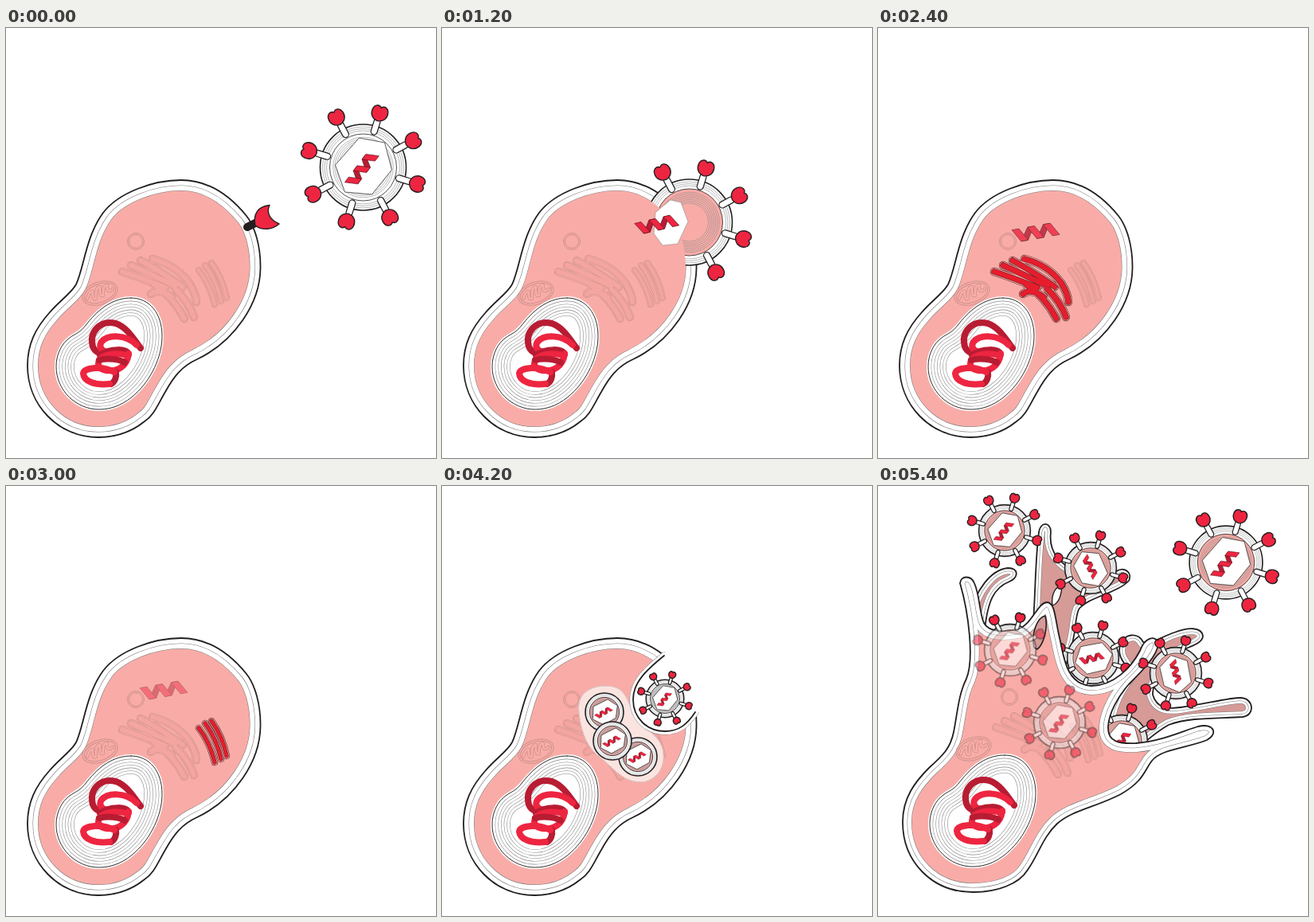
Write an HTML page that moves like this. It is 540 px wide and 540 px high and loops after 6000 ms.

```html
<!DOCTYPE html>
<html lang="en">
<head>
<meta charset="utf-8">
<title>Virus life cycle</title>
<style>
  html, body { margin: 0; width: 100%; height: 100%; overflow: hidden; background: #fff; }
  svg { display: block; width: 100%; height: 100%; }
  .scene { visibility: hidden; animation: show 6s step-end infinite; animation-delay: calc(var(--i) * 600ms - 6000ms); }
  @keyframes show { 0% { visibility: visible; } 10%, 100% { visibility: hidden; } }
  .ink { stroke: #231f20; vector-effect: non-scaling-stroke; stroke-linejoin: round; }
  .hair { fill: none; stroke: #888; stroke-width: .6; }
</style>
</head>
<body>
<svg id="stage" viewBox="0 0 540 540"></svg>
<script>
const PINK = '#f9aca7', PALE = '#fbe4e0', ROSE = '#d69a97', RED = '#ee2540', DARK = '#b81c33', INK = '#231f20';
let ids = 0;

const range = (from, to, step) => Array.from({ length: Math.floor((to - from) / step) + 1 }, (_, i) => from + i * step);
const path = (d, fill, stroke, width) =>
  `<path d="${d}" fill="${fill}" stroke="${stroke}" stroke-width="${width}" stroke-linecap="round" stroke-linejoin="round"/>`;
const at = (x, y, s, content, turn = 0) => `<g transform="translate(${x} ${y}) rotate(${turn}) scale(${s})">${content}</g>`;
const fade = (opacity, content) => `<g opacity="${opacity}">${content}</g>`;

// Inner contour lines: wide strokes clipped to the shape, widest first.
function contours(d, fill, depths, line = '#777', edge = 1.8) {
  const id = 'c' + ids++;
  const bands = depths.map(n => path(d, 'none', line, 2 * n + 1.1) + path(d, 'none', '#fff', 2 * n)).join('');
  return `<clipPath id="${id}"><path d="${d}"/></clipPath>
    <g clip-path="url(#${id})">${path(d, fill, 'none', 0)}${bands}</g>${path(d, 'none', INK, edge)}`;
}

const BASE = 'C220,425 210,439 200,457 C190,474 186,486 174,494 C158,507 140,514 116,514 C66,514 27,474 27,424';
const CELL = `M220,191 C252,191 280,209 302,236 C313,250 320,275 319.5,302 C319,345 288,393 240,416 ${BASE} C27,397 37,377 55,357 C69,341 82,333 88,322 C98,301 100,262 122,232 C142,206 186,191 220,191Z`;
const SWOLLEN = `M213,184 C248,181 269,194 287,210 C310,228 324,254 325,280 C329,320 321,347 298,375 C280,396 262,405 240,416 ${BASE} C27,395 45,366 62,344 C80,322 82,296 92,270 C104,234 145,188 213,184Z`;
const NUCLEUS = 'M157,339 C180,339 196,358 196,387 C196,413 182,442 162,460 C150,471 135,479 117,479 C88,479 63,455 63,425 C63,410 70,396 80,389 C88,383 92,384 102,371 C117,352 135,339 157,339Z';
const MITO = 'M102,340 Q105,330 109,331 Q108,342 113,340 Q112,325 118,325 Q117,338 122,336 Q121,323 127,323 Q126,334 134,328';
const ER = 'M146,306 Q168,313 200,326 M157,298 Q180,308 212,324 M169,292 Q190,303 222,325 M184,290 Q214,298 230,320 Q239,335 239,344 M182,334 Q192,326 208,338 M186,322 Q210,338 224,365 M213,328 Q230,345 236,363';
const GOLGI = 'M242,304 Q256,322 262,347 M250,298 Q265,318 270,343 M258,295 Q272,314 277,339';

const dna = [
  ['M169,402 C160,390 152,376 138,371 C118,366 104,382 109,400 C112,408 122,411 132,410', DARK],
  ['M164,398 C150,384 128,385 120,394 C114,403 125,410 140,407', RED],
  ['M118,411 C130,402 153,402 154,410', DARK],
  ['M154,409 C152,425 140,432 126,430 C112,427 114,416 124,412 C134,408 148,409 153,412', RED],
  ['M117,417 C128,414 142,416 149,420', DARK],
  ['M138,432 C139,438 137,444 132,447', DARK],
  ['M136,432 C122,424 98,426 97,434 C98,444 112,449 130,447', RED]
].map(([d, color]) => path(d, 'none', color, 8)).join('');

const nucleus = () => path(NUCLEUS, '#fff', '#fff', 4) +
  contours(NUCLEUS, '#fff', [22, 18.2, 14.6, 11, 7.4, 3.6], '#888', .9) + dna;

function organelle(d, width, active) {
  const line = active ? '#5d2428' : '#cf918d', fill = active ? '#e51d2c' : '#f4a5a0';
  return path(d, 'none', line, width + 3.4) + path(d, 'none', PINK, width + 2.2) +
    path(d, 'none', line, width + .5) + path(d, 'none', fill, width - .7);
}

function organelles(active = '') {
  const line = '#cf918d';
  return `<g fill="none" stroke="${line}"><circle cx="163" cy="268" r="10.5"/><circle cx="163" cy="268" r="8.5"/>
    <g transform="translate(118 333) rotate(-20)"><ellipse rx="23" ry="14"/><ellipse rx="20.5" ry="11.5"/></g></g>` +
    path(MITO, 'none', line, 4.2) + path(MITO, 'none', PINK, 2.6) +
    organelle(ER, 7, active === 'er') + organelle(GOLGI, 4.8, active === 'golgi');
}

const cell = (d = CELL, active) => contours(d, PINK, [13, 6.5]) + organelles(active) + nucleus();

const ribbon = (() => {
  const strips = (points, color, starts) => starts.map(x =>
    `<polygon stroke="#5a1420" stroke-width=".7" stroke-linejoin="round" fill="${color}" points="${points.map(([px, py]) => [px + x, py]).join(' ')}"/>`).join('');
  return strips([[9, 8], [18, 8], [28, -8], [20, -8]], DARK, [-32, -12]) +
    strips([[0, -8], [9, -8], [18, 8], [9, 8]], RED, [-32, -12, 8]);
})();

const rings = (from, to, step) => range(from, to, step).map(r => `<circle class="hair" r="${r}"/>`).join('');

function spikes(indices) {
  return indices.map(i => `<g transform="rotate(${17 + 45 * i})">
    <rect class="ink" stroke-width="1.2" x="43" y="-4" width="21" height="8" rx="4" fill="#fff"/>
    <path class="ink" stroke-width="1.4" d="M61,0 C62,-8 68,-11 74,-10 C80,-9 82,-3 78,0 C82,3 80,9 74,10 C68,11 62,8 61,0Z" fill="${RED}"/></g>`).join('');
}

const ALL = range(0, 7, 1);
const shell = core => `<circle class="ink" r="54" fill="#fff" stroke-width="1.6"/>${rings(46, 51, 2.5)}
  <circle class="ink" r="42" fill="${core}" stroke-width=".8"/>${rings(24, 40, 2.3)}`;
const capsid = `<polygon class="ink" fill="#fff" stroke-width=".7" points="-5,-37 27,-31 36,3 11,34 -23,31 -35,-3"/>`;

function virion(x, y, s, { turn = 0, core = '#f0a8a2', spiked = true } = {}) {
  return at(x, y, s, shell(core) + (spiked ? spikes(ALL) : '') +
    `<g transform="rotate(${turn})">${capsid}<g transform="rotate(-53) scale(.9)">${ribbon}</g></g>`);
}
const bud = (x, y, r, turn = 22) => virion(x, y, r / 54, { turn, core: '#d9a5a2', spiked: false });

const receptor = path('M303,250 L315,244', 'none', INK, 10) +
  path('M313,248 C310,234 316,224 331,222.5 C327,231 330,240 343,246 C335,253 322,255 313,248Z', RED, INK, 1.4);

function fusion(x, y, s, content) {
  const id = 'm' + ids++;
  return contours(CELL, PINK, [13, 6.5]) + at(x, y, s, shell(PINK) + spikes([0, 1, 5, 6, 7])) +
    `<mask id="${id}">${path(CELL, '#fff', '#000', 27.4)}</mask><rect width="540" height="540" fill="${PINK}" mask="url(#${id})"/>` +
    organelles() + nucleus() + content;
}

const vesicle = d => path(d, PALE, '#b98f8c', 1) + path(d, 'none', '#fff', .5);

function cavity(arc, gap) {
  return (gap ? path(arc, 'none', '#888', 9) + path(arc, 'none', '#fff', 8) : '') +
    path(arc + ' L350,284 L350,190 L290,190Z', '#fff', 'none', 0) + path(arc, 'none', INK, 1.8);
}

const freeVirus = (x, y) => virion(x, y, 1, { core: '#fff' });
const looseRna = opacity => fade(opacity, at(201, 256, 1, ribbon, -10));

function budding() {
  const arc = 'M279,213 C258,230 240,246 240,268 C240,292 258,308 280,308 C298,308 308,299 318,284';
  return cell() +
    vesicle('M172,285 C168,262 185,251 205,251 C225,251 230,260 238,280 C248,305 275,310 278,335 C281,360 262,372 250,372 C225,372 212,350 195,338 C180,325 174,305 172,285Z') +
    bud(204, 284, 24) + bud(246, 340, 24) + bud(214, 320, 24) + cavity(arc, true) +
    virion(280, 267, .44, { core: '#ccc' });
}

function release() {
  const spots = [[174, 262], [187, 300], [257, 277], [222, 295], [209, 251], [150, 285], [264, 322]];
  const arc = 'M284,207 C260,224 243,240 243,260 C244,288 264,304 288,304 C306,304 318,295 325,280';
  return cell(SWOLLEN) +
    spots.map(([x, y]) => `<circle cx="${x}" cy="${y}" r="41.5" fill="${PALE}"/>`).join('') +
    spots.map(([x, y]) => bud(x, y, 33, 15)).join('') + cavity(arc) +
    virion(296, 254, .435, { core: '#ccc' }) + virion(378.5, 188.5, .64);
}

function burst() {
  const pods = [
    'M116,165 C121,130 143,105 163,103 C178,103 176,116 165,120 C145,128 138,145 134,180Z',
    'M190,215 C198,180 196,100 202,58 C204,44 217,45 217,58 C214,82 228,98 250,108 C275,125 285,118 298,108 C308,100 320,108 315,119 C300,135 262,140 252,155 C246,170 250,185 240,210 C236,230 230,240 220,250Z',
    'M285,330 C288,290 296,262 318,236 C310,222 300,215 304,200 C308,186 326,182 333,196 C345,198 355,190 372,184 C390,177 406,177 408,188 C408,200 385,202 372,212 C355,228 345,248 345,262 C350,280 365,280 380,278 C410,274 440,266 455,266 C472,266 474,288 458,290 C430,292 390,290 365,300 C350,308 340,318 325,330Z'
  ];
  const front = 'M103,122 C104,112 117,112 121,122 C128,138 127,158 133,172 C140,184 160,183 175,180 C194,174 200,147 212,146 C223,146 222,168 229,195 C234,222 240,250 268,251 C296,251 318,228 329,207 C335,190 349,186 352,198 C351,213 332,232 315,249 C301,265 290,285 289,302 C288,322 304,324 324,323 C358,320 384,307 402,302 C423,297 427,312 413,319 C389,329 356,330 344,345 C334,358 334,370 305,387 C272,404 244,407 225,424 C207,441 202,462 188,482 C177,500 150,510 119,510 C68,510 31,472 31,422 C31,392 46,372 64,354 C82,338 91,329 95,309 C100,284 101,262 111,242 C121,218 114,160 103,122Z';
  const caught = virion(166, 206, .6), inside = virion(228, 297, .6);
  return pods.map(d => contours(d, ROSE, [7, 3.5])).join('') +
    path('M219,150 C217,135 224,125 231,126 C230,138 226,148 219,150Z', '#fff', INK, 1.4) +
    virion(270, 216, .6, { turn: 38 }) + virion(306, 320, .6) + caught +
    contours(front, PINK, [11, 5.5]) +
    `<g transform="translate(2 -3)">${organelles()}</g><g transform="translate(2 -1)">${nucleus()}</g>` +
    path('M196,203 C192,185 200,165 210,163 C214,177 208,199 200,205Z', ROSE, INK, 1.6) +
    fade(.55, caught + inside) +
    virion(159, 56, .6) + virion(267, 103, .6, { turn: 115 }) + virion(374, 235, .6, { turn: 128 }) + virion(437, 96, .85);
}

const scenes = [
  () => cell() + receptor + freeVirus(448.5, 175),
  () => cell() + receptor + freeVirus(406.5, 198),
  () => fusion(310.5, 244, 1,
    path('M287,216 L300,219 L309,243 L296,271 L277,273 L266,258 L268,232Z', '#fff', '#777', .5) + at(272.5, 246, .93, ribbon, -13)),
  () => fusion(303, 232, .6, at(235, 250, .95, ribbon, -11)),
  () => cell(CELL, 'er') + looseRna(.8),
  () => cell(CELL, 'golgi') + looseRna(.45),
  () => cell(CELL, 'golgi') + looseRna(.25) +
    vesicle('M218,240 C216,222 230,213 245,214 C270,216 296,245 298,272 C299,288 288,297 274,297 C258,297 252,290 246,275 C240,262 220,262 218,240Z') +
    bud(242.5, 238.5, 21, 15) + bud(273, 270, 21, 15),
  budding,
  release,
  burst
];

document.getElementById('stage').innerHTML =
  scenes.map((draw, i) => `<g class="scene" style="--i:${i}">${draw()}</g>`).join('');
</script>
</body>
</html>
```
